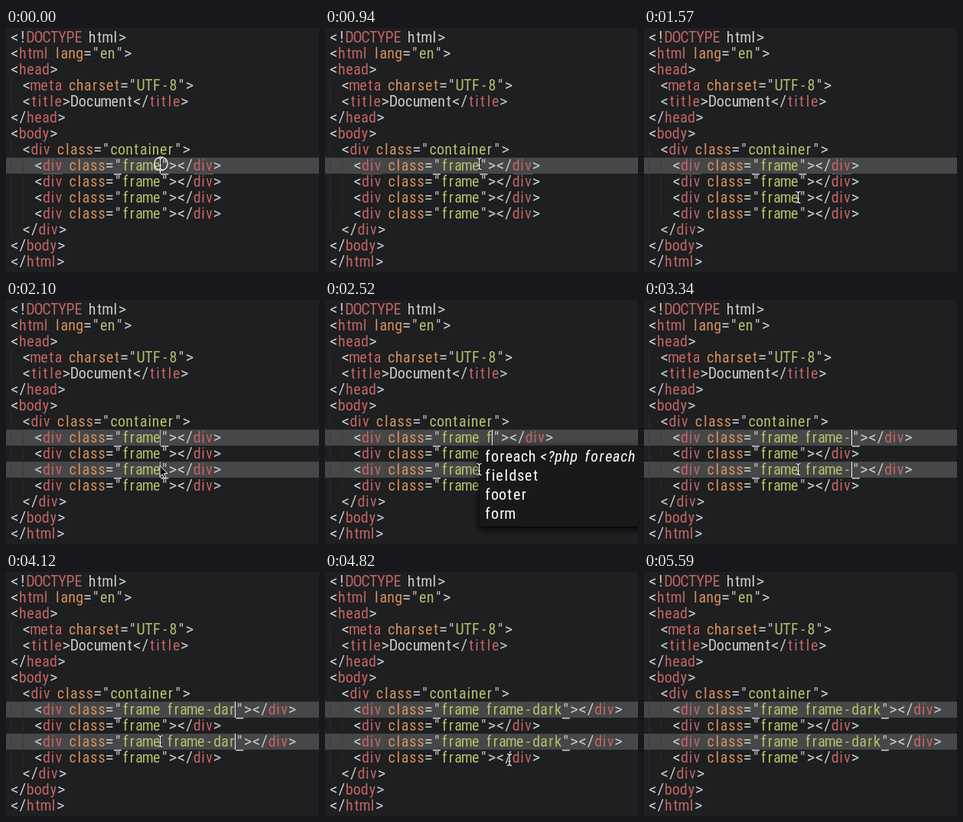
An HTML page that plays this animation: 409x320 px, repeating every 5.69 s.

```html
<!DOCTYPE html>
<html lang="en">
<head>
<meta charset="UTF-8">
<title>Multiple carets in an editor</title>
<style>
  html, body { margin: 0; width: 100%; height: 100%; overflow: hidden; background: #1d1f21; }
  svg { display: block; width: 409px; height: 320px; }
  text {
    font: 400 20px "Roboto Condensed", Roboto, "Liberation Sans", sans-serif;
    font-stretch: 75%; white-space: pre; text-anchor: middle; fill: #c9cbc9;
  }
  .punct { font-family: Roboto, "Liberation Sans", sans-serif; font-stretch: normal; }
  .tag { fill: #c46262; }
  .attr { fill: #d68d5a; }
  .str { fill: #b5bd68; }
  .menu { fill: #fff; }
  .slant { font-style: italic; }
  .popup { filter: drop-shadow(0 3px 5px #000); }
</style>
</head>
<body>
<svg id="stage" viewBox="0 0 409 320"></svg>
<script>
const stage = document.getElementById('stage');
const LOOP = 5690, ROW = 21, TOP = 2, LEFT = 5.8, INDENT = 15.6;

// Glyph advances of the editor face; capitals take 10.4 px, all other glyphs 10 px.
const ADVANCE = {
  ' ': 8, '<': 11, '>': 11, '"': 11, '=': 10.5, '-': 11.5, '?': 9,
  i: 6, l: 7.5, t: 8.7, f: 9, r: 8.5, m: 12.5, s: 10.3, h: 10.2, k: 9.5
};
const advance = c => ADVANCE[c] || (/[A-Z]/.test(c) ? 10.4 : 10);
const measure = s => [...s].reduce((sum, c) => sum + advance(c), 0);
const escape = s => s.replace(/&/g, '&amp;').replace(/</g, '&lt;');

const SYNTAX = /(?<tag>(?<=<!?\/?)\w+)|(?<attr>\w+(?==))|(?<str>(?<=")[^"]+(?="))|(?<punct>[^\w\s])|\w/g;

const KEYS = [[2220, ' '], [2460, 'f'], [2630, 'r'], [2750, 'a'], [2930, 'm'], [3050, 'e'],
  [3340, '-'], [3760, 'd'], [3820, 'a'], [4120, 'r'], [4290, 'k']];

// Caret opacity as [time, value] points, blended linearly.
const BLINK = [[0, 1], [410, 1], [580, 0], [940, 0], [1110, 1], [1400, 1], [1560, 0], [1629, 0],
  [1630, 1], [2099, 1], [2100, .65], [2219, .65], [2220, 1], [4640, 1], [4810, 0],
  [5230, 0], [5400, 1], [5589, 1], [5590, 0], [LOOP, 0]];

function blend(points, t) {
  const i = points.findIndex(p => p[0] > t);
  const [t0, a] = points[i - 1], [t1, b] = points[i];
  return a + (b - a) * (t - t0) / (t1 - t0);
}

function ease(t, from, to) {
  const p = Math.min(1, Math.max(0, (t - from) / (to - from)));
  return p * p * (3 - 2 * p);
}

const rect = (x, y, w, h, fill, opacity = 1) =>
  `<rect x="${x}" y="${y}" width="${w}" height="${h}" fill="${fill}" opacity="${opacity}"/>`;

function run(s, x, y, style) {
  const centres = [...s].map(c => {
    const centre = x + advance(c) / 2;
    x += advance(c);
    return centre.toFixed(1);
  });
  return `<text class="${style}" x="${centres.join(' ')}" y="${y}">${escape(s)}</text>`;
}

function codeLine(s, depth, row) {
  let out = '';
  for (const m of s.matchAll(SYNTAX)) {
    const style = Object.keys(m.groups).find(k => m.groups[k]) || '';
    const x = LEFT + depth * INDENT + measure(s.slice(0, m.index));
    out += run(m[0], x, TOP + row * ROW + 16.5, style);
  }
  return out;
}

function page(extra) {
  const frame = (more = '') => [2, `<div class="frame${more}"></div>`];
  return [
    [0, '<!DOCTYPE html>'], [0, '<html lang="en">'], [0, '<head>'],
    [1, '<meta charset="UTF-8">'], [1, '<title>Document</title>'], [0, '</head>'],
    [0, '<body>'], [1, '<div class="container">'],
    frame(extra), frame(), frame(extra), frame(),
    [1, '</div>'], [0, '</body>'], [0, '</html>']
  ].map(([depth, s], row) => codeLine(s, depth, row)).join('');
}

function guide(x, from, to) {
  return `<path d="M${x} ${TOP + from * ROW}V${TOP + to * ROW}" stroke="#313335" stroke-dasharray="1 1"/>`;
}

const START = LEFT + 2 * INDENT;
const QUOTE = START + measure('<div class=');

function marks(row, caretX, opacity) {
  const y = TOP + row * ROW;
  return rect(QUOTE + .3, y + 21, 10, 1.5, '#d0d0d0') +
    rect(caretX + .8, y + 21, 10, 1.5, '#d0d0d0') +
    rect(Math.floor(caretX), y, 1, ROW, '#f0f0f0', opacity);
}

function tagDots(x) {
  return `<path d="M${x} 191.5h25" stroke="#999" stroke-dasharray="1 1"/>`;
}

function menu(t) {
  if (t < 2520 || t >= 2930) return '';
  const names = t < 2630 ? ['fieldset', 'footer', 'form'] : t < 2750 ? ['form'] : [];
  const y = 191, step = 25;
  let out = `<g class="popup">${rect(202, y, 220, 31 + step * names.length, '#19191a')}</g>`;
  ['foreach', ...names].forEach((s, i) => {
    out += run(s, 208, y + 21 + i * step, 'menu');
  });
  return out + run('<?php foreach', 280, y + 21, 'menu slant');
}

function beam(x, y) {
  const d = 'M-3-7.5Q0-7.5 0-5Q0-7.5 3-7.5M0-5V5M-3 7.5Q0 7.5 0 5Q0 7.5 3 7.5M-1.5 2h3';
  return `<g transform="translate(${x} ${y})" fill="none">` +
    `<path d="${d}" stroke="#111" stroke-width="2.6"/><path d="${d}" stroke="#fff" stroke-width="1.2"/></g>`;
}

function ripple(x, y) {
  return `<circle cx="${x}" cy="${y}" r="8.7" fill="none" stroke="#eee" stroke-width="1.4"/>`;
}

function pointer(t) {
  if (t >= 1630 && t < 2220) {
    return '<path d="M201 217v14.5l3.3-3 2.3 5.3 2.4-1-2.3-5.2h4.3z" fill="#111" stroke="#fff"/>' +
      (t < 1690 ? ripple(202.5, 218) : '');
  }
  const out = ease(t, 4640, 5170), leave = ease(t, 5170, 5400);
  const x = 201.5 + 146.5 * out + 5 * leave;
  const y = 178 + 44 * ease(t, 940, 1460) + 90 * out + 24 * leave;
  return beam(x, y) + (t < 60 ? ripple(202.5, 178) : '');
}

function draw(t) {
  const extra = KEYS.filter(k => k[0] <= t).map(k => k[1]).join('');
  const both = t >= 1630;
  const caretX = START + measure('<div class="frame' + extra);
  const rows = both ? [8, 10] : [8];
  const opacity = blend(BLINK, t);
  stage.innerHTML = rect(0, 0, 409, 320, '#1d1f21') +
    rows.map(r => rect(0, TOP + r * ROW, 409, ROW, '#464748')).join('') +
    guide(6.5, 3, 5) + guide(6.5, 7, 13) + guide(22.5, 8, 12) +
    page(extra) +
    (both ? '' : tagDots(48.5) + tagDots(246)) +
    rows.map(r => marks(r, caretX, opacity)).join('') +
    menu(t) + pointer(t);
}

const begin = performance.now();
function tick() {
  draw((performance.now() - begin) % LOOP);
  requestAnimationFrame(tick);
}
tick();
</script>
</body>
</html>
```
